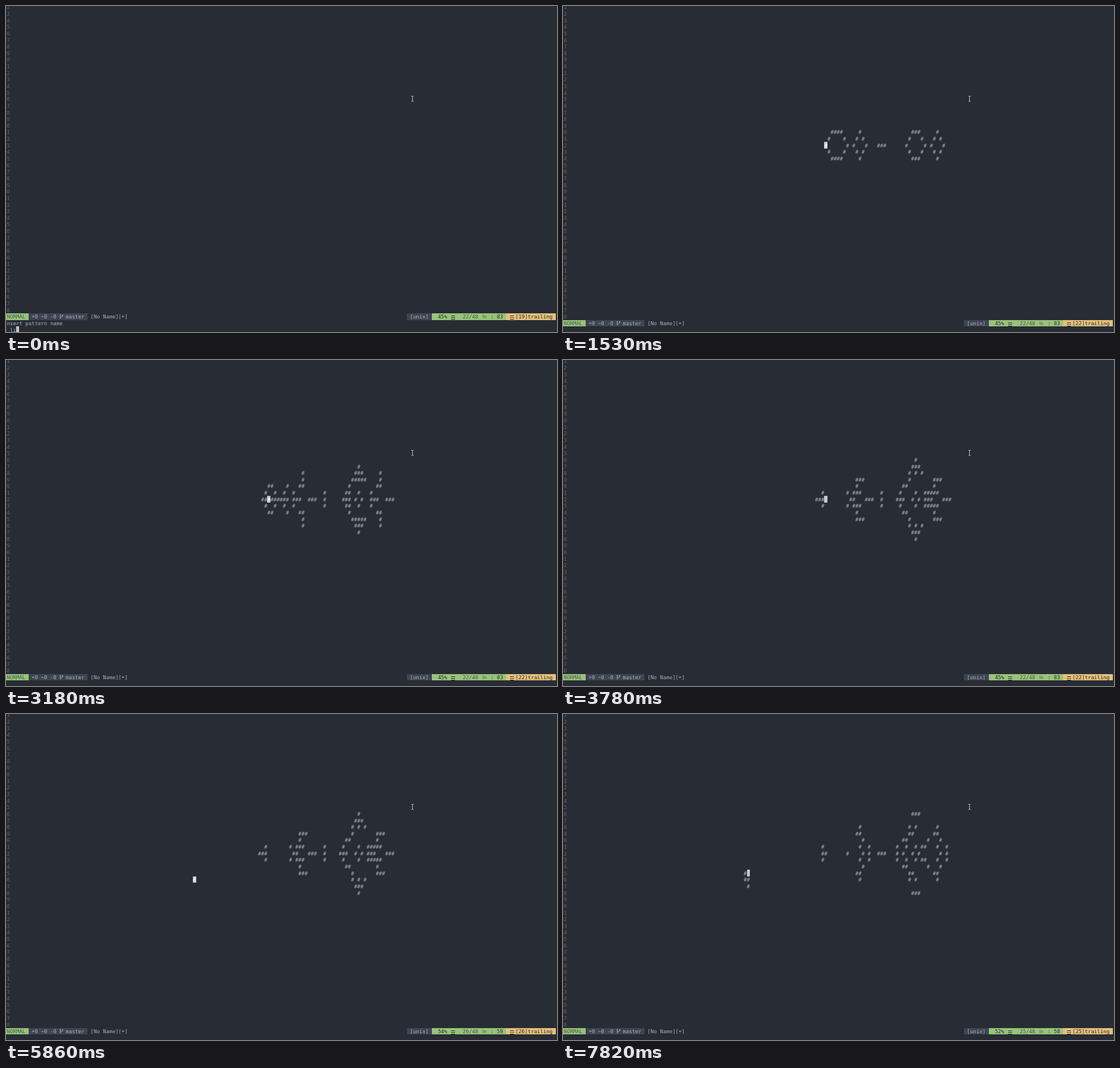
Recreate the animation shown at these times as an HTML page with a canvas. Size 973 by 576 pixels, loop 8 s.

```html
<!DOCTYPE html>
<html lang="en">
<head>
<meta charset="utf-8">
<title>Game of Life in an editor</title>
<style>
html, body { margin: 0; width: 100%; height: 100%; overflow: hidden; background: #282c34; }
canvas { display: block; }
</style>
</head>
<body>
<canvas id="stage" width="973" height="576"></canvas>
<script>
const ctx = document.getElementById('stage').getContext('2d');
const LOOP = 8000, COLS = 178, LINES = 48;
const CW = 5.476, RH = 11.64, X0 = -4, Y0 = -4.2, BASE = 9.5, GUTTER = 3;
const FONT = '9.1px "DejaVu Sans Mono", monospace';
const C = {
  bg: '#282c34', fg: '#abb2bf', num: '#5c6370', grey: '#3e4452',
  green: '#98c379', yellow: '#e5c07b', soft: '#4b5a50',
  cursor: '#c7c7c7', cursorText: '#ffffff'
};

const key = (line, col) => line * 1000 + col;

function evolve(cells) {
  const count = new Map();
  for (const k of cells)
    for (const dy of [-1000, 0, 1000])
      for (const dx of [-1, 0, 1])
        if (dx || dy) count.set(k + dx + dy, (count.get(k + dx + dy) || 0) + 1);
  const next = new Set();
  for (const [k, n] of count) if (n === 3 || (n === 2 && cells.has(k))) next.add(k);
  return next;
}

// Timeline of hard changes; each step alters the previous state.
const state = {
  line: 22, col: 83, trail: 19, prompt: '> li', cells: new Set()
};
const steps = [];
function at(time, change) {
  Object.assign(state, change);
  steps.push({ time, ...state });
}
const tick = time => at(time, { cells: evolve(state.cells) });
const put = (time, line, col) =>
  at(time, { line, col, trail: line, cells: new Set(state.cells).add(key(line, col)) });

const seed = '######## #####   ###      ####### #####';
const row = new Set();
[...seed].forEach((ch, i) => { if (ch === '#') row.add(key(22, 83 + i)); });

at(0, {});
at(150, { prompt: '> lin' });
at(540, { prompt: '> line' });
at(690, { prompt: null, trail: 22, cells: row });
[1290, 1530, 1830, 2130, 2430, 2880, 3180, 3480, 3780].forEach(tick);
at(4080, { col: 82 });
at(4380, { col: 78 });
at(4530, { col: 72 });
at(4680, { col: 65 });
at(4830, { col: 59 });
at(5080, { line: 23 });
at(5380, { line: 26 });
put(5860, 26, 59);
put(6000, 26, 58);
put(6150, 26, 57);
at(6450, { line: 25 });
put(6630, 25, 57);
at(7220, { col: 58 });
tick(7820);

const px = col => X0 + col * CW;
const py = r => Y0 + r * RH;

function text(str, col, r, color) {
  ctx.fillStyle = color;
  [...str].forEach((ch, i) => {
    if (ch !== ' ') ctx.fillText(ch, px(col + i), py(r) + BASE);
  });
}

function fillCells(from, to, r, color) {
  const x = Math.round(px(from)), y = Math.round(py(r));
  ctx.fillStyle = color;
  ctx.fillRect(x, y, Math.round(px(to)) - x, Math.round(py(r + 1)) - y);
}

function trigram(col, r, broken) {
  const x = Math.round(px(col)) + 1, y = Math.round(py(r)) + 4;
  ctx.fillStyle = C.bg;
  for (let i = 0; i < 3; i++) {
    if (broken && i === 1) {
      ctx.fillRect(x, y + 3, 3, 1);
      ctx.fillRect(x + 4, y + 3, 3, 1);
    } else ctx.fillRect(x, y + i * 3, 7, 1);
  }
}

function branch(col, r) {
  const x = px(col) + 1.3, y = py(r) + 2.5;
  ctx.strokeStyle = C.fg;
  ctx.lineWidth = 1;
  ctx.beginPath();
  ctx.moveTo(x, y);
  ctx.lineTo(x, y + 7.5);
  ctx.moveTo(x, y + 5);
  ctx.lineTo(x + 4, y + 3);
  ctx.lineTo(x + 4, y + 0.5);
  ctx.moveTo(x - 1, y + 0.5);
  ctx.lineTo(x + 1, y + 0.5);
  ctx.moveTo(x + 2.7, y + 1);
  ctx.lineTo(x + 5.3, y + 1);
  ctx.stroke();
}

function statusLine(s, r) {
  fillCells(0, 8, r, C.green);
  text('NORMAL', 1, r, C.soft);
  fillCells(8, 27, r, C.grey);
  text('+0 ~0 -0', 9, r, C.fg);
  branch(18, r);
  text('master', 20, r, C.fg);
  text('[No Name][+]', 28, r, C.fg);

  fillCells(130, 138, r, C.grey);
  text('[unix]', 131, r, C.fg);
  fillCells(138, 162, r, C.green);
  text(Math.floor(s.line / LINES * 100) + '%', 140, r, C.bg);
  trigram(144, r, false);
  text(s.line + '/' + LINES, 148, r, C.soft);
  ctx.font = '8px "DejaVu Sans", sans-serif';
  ctx.fillText('ln', px(154) + 1.7, py(r) + BASE);
  ctx.font = FONT;
  text(': ' + s.col, 157, r, C.bg);
  fillCells(162, COLS, r, C.yellow);
  trigram(163, r, true);
  text('[' + s.trail + ']trailing', 165, r, C.bg);
}

function pointer(x, y) {
  const beam = () => {
    ctx.beginPath();
    ctx.moveTo(x - 2, y - 5);
    ctx.lineTo(x, y - 4);
    ctx.lineTo(x + 2, y - 5);
    ctx.moveTo(x, y - 4);
    ctx.lineTo(x, y + 4);
    ctx.moveTo(x - 2, y + 5);
    ctx.lineTo(x, y + 4);
    ctx.lineTo(x + 2, y + 5);
    ctx.stroke();
  };
  ctx.strokeStyle = '#15171c';
  ctx.lineWidth = 2.4;
  beam();
  ctx.strokeStyle = '#e4e6ea';
  ctx.lineWidth = 1;
  beam();
}

function draw(s) {
  ctx.fillStyle = C.bg;
  ctx.fillRect(0, 0, 973, 576);
  ctx.font = FONT;
  ctx.textBaseline = 'alphabetic';

  const top = s.prompt ? 2 : 1;
  for (let n = top; n <= LINES; n++)
    text(String(n).padStart(2), 0, n - top, C.num);
  for (const k of s.cells)
    text('#', k % 1000 - 1 + GUTTER, Math.floor(k / 1000) - top, C.fg);

  statusLine(s, LINES + 1 - top);
  if (s.prompt) {
    text('Insert pattern name', 0, 48, C.fg);
    text(s.prompt, 0, 49, C.fg);
    fillCells(s.prompt.length, s.prompt.length + 1, 49, C.cursor);
  } else {
    const col = s.col - 1 + GUTTER, r = s.line - top;
    fillCells(col, col + 1, r, C.cursor);
    if (s.cells.has(key(s.line, s.col))) text('#', col, r, C.cursorText);
  }
  pointer(717.8, 164);
}

const start = performance.now();
function frame() {
  const t = Math.max(0, performance.now() - start) % LOOP;
  draw(steps.findLast(s => s.time <= t));
  requestAnimationFrame(frame);
}
frame();
</script>
</body>
</html>
```
